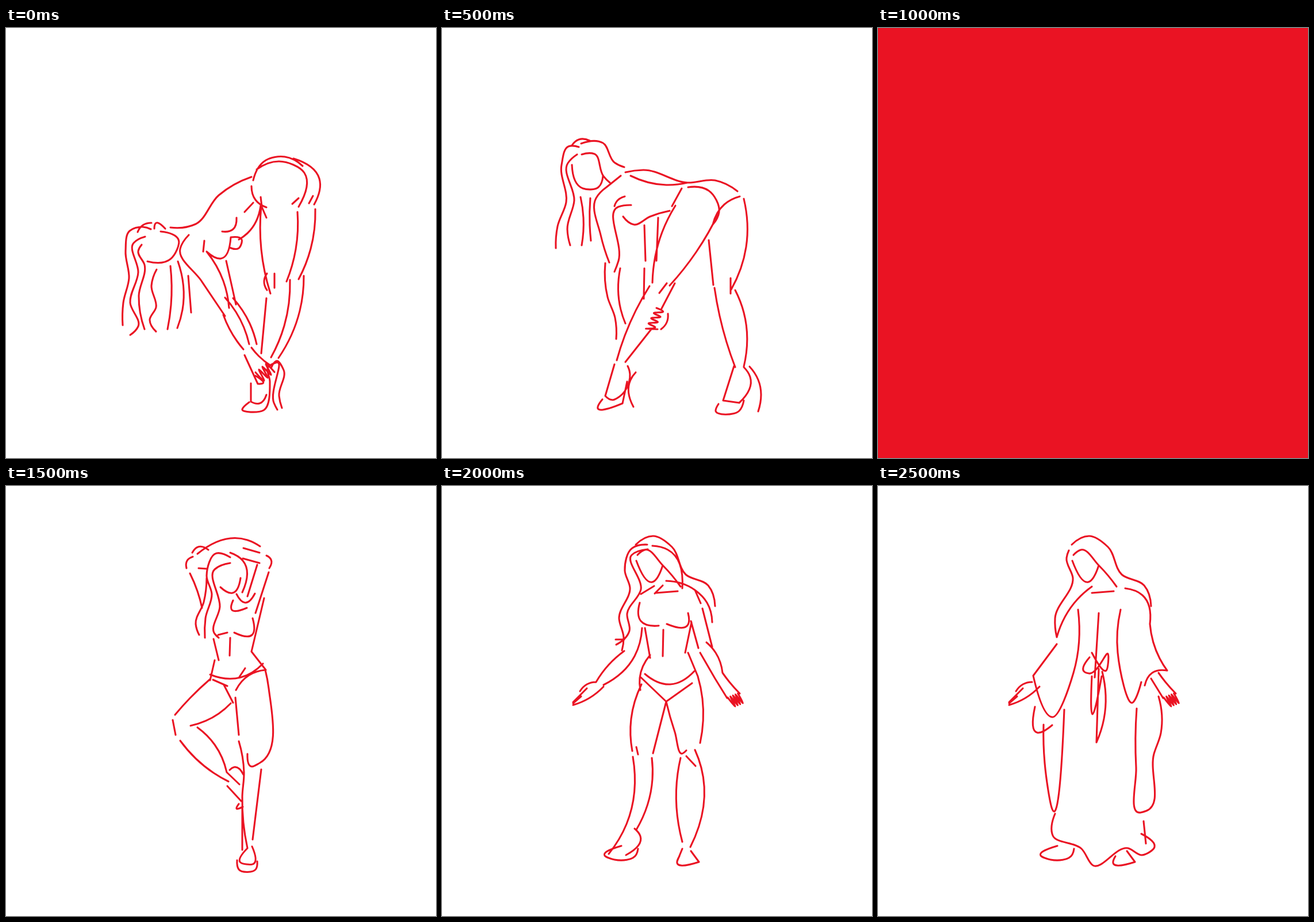
These frames come from a looping animation (748 px wide and 748 px high, 3 s). An HTML page with a canvas:

```html
<!DOCTYPE html>
<html lang="en">
<head>
<meta charset="utf-8">
<title>Line figures</title>
<style>
html, body { margin: 0; width: 100%; height: 100%; overflow: hidden; background: #fff; }
canvas { display: block; width: 100vw; height: 100vh; }
</style>
</head>
<body>
<canvas id="stage" width="748" height="748"></canvas>
<script>
const RED = "#ea1323";
const ctx = document.getElementById("stage").getContext("2d");

// Smooth stroke through x, y pairs, with tangents weighted by chord length.
function curve(...xy) {
  const p = [];
  for (let i = 0; i < xy.length; i += 2) p.push([xy[i], xy[i + 1]]);
  const last = p.length - 1;
  const chord = i => Math.hypot(p[i + 1][0] - p[i][0], p[i + 1][1] - p[i][1]);
  const slope = (i, k) => (p[i + 1][k] - p[i][k]) / chord(i);
  const tangent = (i, k) => {
    if (last === 1) return slope(0, k);
    if (i === 0) return 2 * slope(0, k) - tangent(1, k);
    if (i === last) return 2 * slope(last - 1, k) - tangent(last - 1, k);
    const a = chord(i - 1), b = chord(i);
    return (slope(i - 1, k) * b + slope(i, k) * a) / (a + b);
  };
  ctx.moveTo(...p[0]);
  for (let i = 0; i < last; i++) {
    const reach = chord(i) / 3;
    const out = p[i].map((v, k) => v + tangent(i, k) * reach);
    const into = p[i + 1].map((v, k) => v - tangent(i + 1, k) * reach);
    ctx.bezierCurveTo(...out, ...into, ...p[i + 1]);
  }
}

// Fingers: a zigzag of n turns, stepping by (dx, dy) and swinging by (sx, sy).
function fingers(x, y, dx, dy, sx, sy, n) {
  const xy = [];
  for (let i = 0; i < n; i++) xy.push(x + dx * i + sx * (i % 2), y + dy * i + sy * (i % 2));
  curve(...xy);
}

function bending() {
  // hair and head
  curve(203,517, 204,478, 214,435, 208,388, 215,353, 238,346, 252,350);
  curve(229,355, 238,343, 253,339);
  curve(258,349, 260,340, 277,349);
  curve(242,363, 222,374, 230,425, 216,478, 230,519, 216,534);
  curve(236,377, 230,388, 241,412, 231,466, 241,524);
  curve(262,420, 253,448, 261,486, 250,508, 261,528);
  curve(286,414, 287,482, 281,524);
  curve(299,406, 307,490, 298,522);
  curve(317,431, 322,495);
  curve(246,406, 286,402, 300,368, 269,354);
  // back and chest
  curve(286,347, 330,341, 370,291, 427,259);
  curve(318,360, 303,384, 340,440, 381,501);
  curve(345,370, 343,389);
  curve(349,389, 374,401, 391,364);
  curve(391,364, 410,368, 405,383, 389,382);
  curve(376,354, 395,350, 401,330);
  curve(405,368, 420,357, 443,309);
  curve(415,320, 430,304);
  // arms and hand
  curve(349,389, 378,440, 388,487);
  curve(383,405, 400,481);
  curve(381,469, 400,494, 423,550);
  curve(395,470, 424,514, 436,550);
  curve(378,499, 402,545, 413,559);
  curve(427,556, 440,571, 460,587);
  curve(415,569, 438,619);
  fingers(434,599, 3,-2.5, 12,17, 8);
  curve(438,619, 447,618, 434,605);
  // hips
  curve(430,265, 452,230, 485,224, 516,240);
  curve(436,246, 475,232, 519,252, 509,311);
  curve(500,227, 545,262, 536,307);
  curve(498,306, 509,296);
  curve(527,305, 534,292);
  curve(427,275, 434,299, 453,312);
  curve(443,294, 445,311);
  curve(444,309, 453,330);
  // legs and shoes
  curve(444,309, 444,385, 460,462);
  curve(454,427, 449,440, 454,456);
  curve(467,427, 467,452);
  curve(507,320, 504,385, 488,441);
  curve(538,315, 530,384, 509,437);
  curve(453,470, 444,566);
  curve(494,438, 484,518, 461,573);
  curve(518,431, 511,492, 474,574);
  curve(426,618, 426,650);
  curve(426,650, 441,653, 453,638);
  curve(423,651, 411,663, 448,665, 459,615, 456,590, 470,582, 466,652, 472,664);
  curve(461,592, 471,579, 483,595, 475,640, 480,661);
}

function leaning() {
  // hair and head
  curve(198,383, 201,345, 216,303, 208,238, 220,206, 238,207);
  curve(226,204, 238,194, 257,196);
  curve(242,201, 280,200, 300,234, 317,242);
  curve(235,220, 219,235, 230,300, 218,350, 223,378);
  curve(241,294, 246,330, 243,378);
  curve(258,296, 257,343, 259,370);
  curve(226,238, 245,279, 272,277, 280,257);
  curve(243,220, 265,219, 281,258, 292,269);
  // back and chest
  curve(311,257, 286,277);
  curve(286,277, 268,296, 276,360, 291,408);
  curve(319,251, 350,247, 427,269, 475,265, 514,284);
  curve(328,257, 390,273, 427,269);
  curve(300,310, 303,303, 318,293);
  curve(329,308, 307,311, 307,405, 300,424);
  curve(315,328, 334,342, 362,328, 396,318);
  // arms and hand
  curve(352,343, 354,405);
  curve(376,330, 373,405);
  curve(352,418, 351,471);
  curve(284,409, 288,468, 301,504, 303,541);
  curve(310,418, 311,490, 319,514);
  fingers(373,487, -2.3,4.5, 14,2, 9);
  curve(355,523, 375,524);
  curve(393,497, 391,512, 381,524);
  // hips
  curve(400,310, 417,279);
  curve(428,277, 464,283, 482,320, 471,342);
  // legs
  curve(406,309, 383,355, 366,443);
  curve(482,320, 442,390, 396,448);
  curve(518,293, 491,307, 471,342);
  curve(525,297, 529,381, 503,455);
  curve(502,435, 502,462);
  curve(464,369, 472,447);
  curve(474,452, 483,501, 510,590);
  curve(510,456, 525,495, 525,589);
  curve(361,449, 318,535, 304,578);
  curve(405,444, 382,488);
  curve(364,524, 319,581);
  curve(391,444, 378,461);
  // shoes
  curve(300,585, 284,640);
  curve(284,640, 297,647, 309,641, 326,596, 323,588);
  curve(279,646, 271,659, 314,653);
  curve(314,653, 322,615);
  curve(337,599, 328,612, 333,659);
  curve(508,588, 489,648);
  curve(489,648, 517,652);
  curve(517,652, 536,607, 525,590);
  curve(535,589, 550,612, 550,667);
  curve(481,654, 476,665, 517,666, 525,648);
}

function balancing() {
  // arms
  curve(324,116, 334,106, 352,111);
  curve(333,118, 420,94, 442,105);
  curve(413,108, 441,116);
  curve(325,123, 315,130, 314,143);
  curve(453,121, 461,128, 458,143);
  curve(412,126, 441,134);
  curve(335,143, 349,144);
  curve(320,152, 333,183, 341,212);
  curve(437,137, 420,192);
  curve(457,150, 434,221);
  // hair and face
  curve(390,124, 366,117, 349,156, 358,188, 347,230, 346,264);
  curve(349,160, 344,202, 330,240, 336,259);
  curve(390,134, 363,145, 372,210, 363,257, 370,264);
  curve(390,116, 412,130, 411,185);
  curve(373,176, 394,186, 408,160);
  curve(401,188, 416,203, 433,187);
  // torso
  curve(395,199, 392,214, 419,212);
  curve(369,259, 385,255);
  curve(397,255, 428,259, 429,230);
  curve(390,264, 389,295);
  curve(449,195, 427,288);
  curve(427,288, 452,320);
  curve(361,266, 370,303);
  curve(363,303, 355,338);
  // hips
  curve(355,328, 408,333, 447,309);
  curve(406,332, 416,317);
  curve(360,337, 385,348);
  curve(379,346, 395,377);
  curve(400,355, 423,329, 451,320);
  // legs
  curve(355,336, 320,369, 294,398);
  curve(290,407, 295,433);
  curve(303,443, 361,499, 387,514);
  curve(321,417, 370,396, 391,378);
  curve(333,420, 363,450, 384,498);
  curve(384,498, 406,519);
  curve(399,368, 405,433);
  curve(405,444, 414,498, 411,540, 420,630);
  curve(451,320, 457,352, 441,482, 427,488, 420,466);
  curve(444,493, 429,615);
  // feet
  curve(389,494, 397,489, 413,502);
  curve(385,522, 409,548);
  curve(405,553, 401,561, 412,558);
  curve(411,560, 411,633);
  curve(420,630, 407,654, 431,657, 428,627);
  curve(402,651, 405,667, 435,666, 437,653);
}

// Parts common to the two upright figures.
function upright() {
  curve(338,130, 366,167, 384,138);
  curve(340,120, 353,111, 384,138, 415,175);
  curve(372,186, 410,183);
  curve(337,102, 367,87, 400,106, 424,154, 463,173, 475,209);
  // left hand
  curve(268,341, 252,345, 240,357);
  curve(252,352, 228,376);
  curve(242,366, 228,378);
  curve(228,381, 256,369, 281,349);
  // right hand
  curve(488,325, 500,341, 518,361);
  curve(475,335, 496,369);
  fingers(497,368, 2.2,-.9, 11,16, 9);
  // feet
  curve(312,626, 283,643, 300,650, 338,641, 341,631);
  curve(413,644, 409,653, 447,654);
  curve(447,654, 433,635);
}

function standing() {
  upright();
  // hair
  curve(357,102, 331,108, 318,147, 327,177, 308,230, 316,264, 313,286);
  curve(358,110, 330,120, 346,180, 322,222, 326,252, 303,276);
  curve(302,267, 317,267);
  curve(366,104, 393,111, 418,178);
  curve(390,165, 440,181, 461,203, 470,237);
  curve(369,174, 346,188);
  curve(384,173, 370,187);
  // chest and arms
  curve(344,203, 346,235, 377,243);
  curve(391,240, 428,241, 428,221);
  curve(348,247, 335,296, 281,346);
  curve(317,287, 290,311, 268,341);
  curve(440,181, 450,204);
  curve(453,213, 470,280);
  curve(433,235, 446,282);
  curve(460,272, 476,290, 488,325);
  curve(449,290, 475,335);
  // waist and hips
  curve(385,250, 384,296);
  curve(353,247, 362,299);
  curve(434,237, 423,290);
  curve(362,294, 344,334, 345,355);
  curve(428,290, 445,331);
  curve(353,327, 397,345, 439,322);
  curve(346,333, 390,375);
  curve(390,375, 435,343);
  // legs and ankles
  curve(347,345, 329,405, 331,461);
  curve(390,375, 367,465);
  curve(338,454, 341,467);
  curve(445,331, 453,370, 449,447);
  curve(390,375, 405,428, 419,465, 425,460);
  curve(332,471, 321,588, 290,640);
  curve(365,473, 366,510, 338,598);
  curve(415,473, 410,500, 418,619);
  curve(440,459, 451,490, 432,628);
  curve(425,470, 441,487);
  curve(335,596, 345,609, 320,642);
  curve(418,631, 409,653);
}

function robed() {
  upright();
  // veil
  curve(332,112, 328,125, 339,160, 308,230, 311,263);
  curve(372,175, 347,197, 311,263);
  curve(430,178, 460,190, 473,240);
  // sleeves
  curve(311,275, 270,330);
  curve(270,330, 303,402, 340,325, 348,215);
  curve(473,240, 490,300, 503,321);
  curve(503,321, 477,325, 464,347);
  curve(422,215, 417,290, 444,376, 458,341);
  // sash
  curve(384,221, 377,333);
  curve(372,290, 397,321, 400,292, 367,326, 360,324, 368,298);
  curve(372,331, 373,397, 389,331);
  curve(384,318, 380,446);
  curve(380,446, 393,405, 390,323);
  // cloak
  curve(273,384, 277,429, 303,416);
  curve(288,415, 290,482, 303,562, 324,389);
  curve(450,387, 449,490, 457,568, 467,565, 480,466, 492,430, 488,366);
  // hem
  curve(308,570, 304,608, 354,631, 374,660, 435,630, 459,642, 481,628, 458,605);
  curve(462,583, 466,622);
}

const scenes = [bending, leaning, null, balancing, standing, robed];
const start = performance.now();

function draw(now) {
  const scene = scenes[Math.floor(Math.max(0, now - start) / 500) % scenes.length];
  ctx.fillStyle = scene ? "#fff" : RED;
  ctx.fillRect(0, 0, 748, 748);
  if (scene) {
    ctx.beginPath();
    scene();
    ctx.strokeStyle = RED;
    ctx.lineWidth = 3.1;
    ctx.lineCap = ctx.lineJoin = "round";
    ctx.stroke();
  }
  requestAnimationFrame(draw);
}
draw(start);
</script>
</body>
</html>
```
